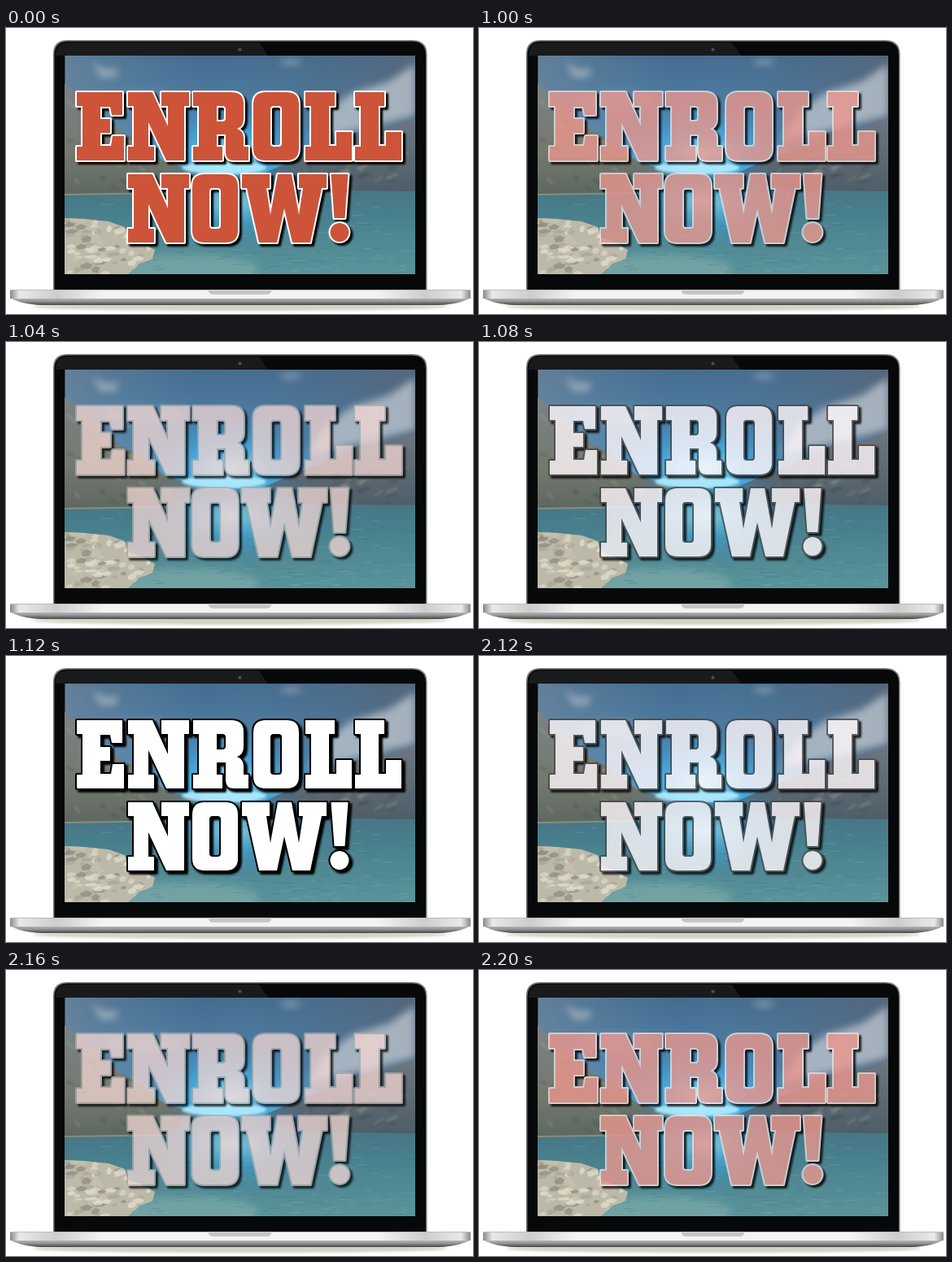
Animation, 574 px wide and 352 px high, one loop 2240 ms. Source, as an HTML page:

```html
<!DOCTYPE html>
<html lang="en">
<head>
<meta charset="utf-8">
<title>Enroll now!</title>
<style>
  html, body { margin: 0; width: 100%; height: 100%; overflow: hidden; background: #fff; }
  svg { display: block; width: 574px; height: 352px; }
  #words {
    stroke-width: 4; stroke-linejoin: round; paint-order: stroke; fill-rule: evenodd;
    filter: drop-shadow(3px 3px 1.3px #000);
  }
</style>
</head>
<body>
<svg viewBox="0 0 574 352">
  <defs>
    <linearGradient id="sky" x2="0" y2="1">
      <stop offset="0" stop-color="#456c8e"/>
      <stop offset=".35" stop-color="#4f86ae"/>
      <stop offset=".55" stop-color="#74b4d4"/>
    </linearGradient>
    <linearGradient id="side">
      <stop offset="0" stop-color="#7c8e9e" stop-opacity=".55"/>
      <stop offset=".4" stop-color="#5d87a8" stop-opacity="0"/>
      <stop offset=".62" stop-color="#526d89" stop-opacity=".2"/>
      <stop offset="1" stop-color="#596577" stop-opacity=".8"/>
    </linearGradient>
    <radialGradient id="glow">
      <stop offset="0" stop-color="#9ce8ff"/>
      <stop offset=".4" stop-color="#45b1e6" stop-opacity=".75"/>
      <stop offset="1" stop-color="#2b86c6" stop-opacity="0"/>
    </radialGradient>
    <linearGradient id="water" x2="0" y2="1">
      <stop offset="0" stop-color="#47707f"/>
      <stop offset=".4" stop-color="#487f8d"/>
      <stop offset="1" stop-color="#5a949a"/>
    </linearGradient>
    <linearGradient id="hillL" x2="0" y2="1">
      <stop offset="0" stop-color="#7b8286"/>
      <stop offset=".6" stop-color="#74796f"/>
      <stop offset="1" stop-color="#5d675f"/>
    </linearGradient>
    <linearGradient id="hillR" x2="0" y2="1">
      <stop offset="0" stop-color="#6d7680"/>
      <stop offset="1" stop-color="#4c5c66"/>
    </linearGradient>
    <linearGradient id="deck">
      <stop offset="0" stop-color="#888"/>
      <stop offset=".02" stop-color="#e9e9e9"/>
      <stop offset=".1" stop-color="#cdcdcd"/>
      <stop offset=".2" stop-color="#f3f3f3"/>
      <stop offset=".8" stop-color="#f3f3f3"/>
      <stop offset=".9" stop-color="#cdcdcd"/>
      <stop offset=".98" stop-color="#e9e9e9"/>
      <stop offset="1" stop-color="#888"/>
    </linearGradient>
    <linearGradient id="belly" x2="0" y2="1">
      <stop offset="0" stop-color="#bdbdbd"/>
      <stop offset=".5" stop-color="#929292"/>
      <stop offset="1" stop-color="#444"/>
    </linearGradient>
    <filter id="soft" x="-50%" y="-50%" width="200%" height="200%"><feGaussianBlur stdDeviation="5"/></filter>
    <filter id="fuzz" x="-20%" y="-50%" width="140%" height="200%"><feGaussianBlur stdDeviation="1.5"/></filter>
    <clipPath id="screen"><path d="M72.500 34H503V303H72.500Z"/></clipPath>
    <clipPath id="shore"><path id="shorePath" d="M72 234L96 235L126 238L146 245L150 258L166 264L183 273L180 284L164 290L150 303H72Z"/></clipPath>
  </defs>

  <!-- laptop -->
  <ellipse cx="288" cy="343" rx="255" ry="5" fill="#d2d2c4" filter="url(#fuzz)"/>
  <path d="M58 323V32Q58 15 75 15H500Q517.500 15 517.500 32V323Z" fill="#777"/>
  <path d="M59.500 323V33Q59.500 16.500 76 16.500H499Q516 16.500 516 33V323Z" fill="#070809"/>
  <path d="M61 34V33Q61 18 76 18H311L322 34Z" fill="#191a1c"/>
  <circle cx="287.500" cy="26.500" r="2.500" fill="#34363b"/>
  <circle cx="287.500" cy="26.500" r="1" fill="#696e78"/>
  <path d="M5 332H571Q558 340 532 341H44Q18 340 5 332Z" fill="url(#belly)"/>
  <path d="M5 324Q5 322 8 322H568Q571 322 571 324V333H5Z" fill="url(#deck)"/>
  <path d="M5 322.500H571" stroke="#bbb"/>
  <path d="M249 322H326V324Q325 328 320 328H255Q250 328 249 324Z" fill="#c6c6c6"/>

  <!-- lake view -->
  <g clip-path="url(#screen)">
    <path d="M72 34H503V303H72Z" fill="url(#sky)"/>
    <path d="M72 34H503V210H72Z" fill="url(#side)"/>
    <ellipse cx="276" cy="158" rx="125" ry="72" fill="url(#glow)"/>
    <g fill="#bac4cc" filter="url(#soft)">
      <path d="M106 42L122 52L138 50L134 60L116 60Z" opacity=".7"/>
      <ellipse cx="350" cy="42" rx="14" ry="3" opacity=".6"/>
      <path d="M503 44L470 66L425 80L392 104L372 138L430 126L503 108Z" opacity=".8"/>
      <ellipse cx="170" cy="90" rx="50" ry="12" opacity=".25"/>
    </g>
    <path d="M72 68L88 82L110 100L142 128L168 142L194 164L226 174L250 180V208H72Z" fill="url(#hillL)"/>
    <path d="M503 112L470 124L432 128L396 146L360 160L318 178V208H503Z" fill="url(#hillR)"/>
    <g id="cliffs" filter="url(#fuzz)"/>
    <path d="M72 206L200 203L230 180H325L360 199L503 201V303H72Z" fill="url(#water)"/>
    <path d="M72 205L200 203" stroke="#a3a793" stroke-width="2" opacity=".6"/>
    <ellipse cx="278" cy="214" rx="125" ry="62" fill="url(#glow)" opacity=".75"/>
    <ellipse cx="268" cy="172" rx="52" ry="8" fill="#b5efff" filter="url(#fuzz)" opacity=".85"/>
    <ellipse cx="225" cy="298" rx="85" ry="20" fill="#86b0ad" filter="url(#soft)" opacity=".55"/>
    <g id="ripples"/>
    <use href="#shorePath" fill="#bdb9a8"/>
    <g id="rocks" clip-path="url(#shore)"/>
  </g>

  <g id="words" role="img" aria-label="ENROLL NOW!"/>
</svg>
<script>
const $ = id => document.getElementById(id);

function add(parent, attrs) {
  const path = document.createElementNS('http://www.w3.org/2000/svg', 'path');
  for (const key in attrs) path.setAttribute(key, attrs[key]);
  $(parent).append(path);
}

let seed = 11;
const rand = (a, b) => {
  seed = seed * 16807 % 2147483647;
  return a + (b - a) * seed / 2147483647;
};

const glyphs = {
  E: 'M0 0H56V28H43L41 18H29V33H41V50H29V66H42L44 54H58V84H0V67H7V17H0Z',
  N: 'M0 0H30L49 42V17H41V0H75V17H69V84H47L25 37V67H32V84H0V67H7V17H0Z',
  R: 'M0 0H47Q62 0 62 14V33Q62 42 54 45Q62 48 62 56V67H68V84H50Q40 84 40 74V52H29V67H36V84H0V67H7V17H0ZM29 17V36H36Q40 36 40 32V21Q40 17 36 17Z',
  O: 'M15 0H41Q56 0 56 15V69Q56 84 41 84H15Q0 84 0 69V15Q0 0 15 0ZM25 17Q21 17 21 21V63Q21 67 25 67H31Q35 67 35 63V21Q35 17 31 17Z',
  L: 'M0 0H36V17H29V66H38V49H57V84H0V67H7V17H0Z',
  W: 'M0 0H34V17H30L35 50L44 0H61L70 50L75 17H70V0H104V17H98L84 84H62L52 42L43 84H21L6 17H0Z',
  '!': 'M0 0H21L17 54H4ZM10.500 60A11.500 11.500 0 1 1 10.400 60Z'
};

function write(text, y, xs) {
  [...text].forEach((ch, i) => add('words', { d: glyphs[ch], transform: `translate(${xs[i]} ${y})` }));
}

write('ENROLL', 79, [87, 150, 230, 304, 368, 429]);
write('NOW!', 180, [150, 229, 290, 399.5]);

// faint streaks on both mountainsides
for (let i = 0; i < 60; i++) {
  const right = i % 2, t = rand(0, 1);
  const x = right ? 495 - 145 * t : 75 + 135 * t;
  const top = right ? 124 + 54 * t : 86 + 88 * t;
  const y = rand(top, 200), run = rand(5, 15) * (right ? -1 : 1);
  add('cliffs', {
    d: `M${x} ${y}l${run} ${rand(3, 9)}`, stroke: rand(0, 1) < .5 ? '#a3a592' : '#39474b',
    'stroke-width': rand(1, 4), opacity: .4
  });
}

for (let i = 0; i < 160; i++) {
  add('ripples', {
    d: `M${rand(110, 495)} ${rand(211, 302)}h${rand(4, 16)}`,
    stroke: i % 2 ? '#8cc4c8' : '#286878', opacity: .25
  });
}

const stones = ['#dcd7c4', '#c9c2ac', '#8f8e80', '#e4e0cf', '#aaa797'];
for (let i = 0; i < 90; i++) {
  const w = rand(6, 18), h = rand(3, 9);
  add('rocks', {
    d: `M${rand(66, 182)} ${rand(232, 302)}l${w * .5} ${-h * .5}l${w * .5} ${h * .4}l${-w * .25} ${h * .6}l${-w * .6} ${h * .1}Z`,
    fill: stones[i % 5], opacity: .75
  });
}

const red = { fill: '#cd5439', stroke: '#fff', opacity: 1 };
const pink = { fill: '#eb968c', stroke: '#e6e2e2', opacity: .8 };
const pale = { fill: '#f5d7d3', stroke: '#aeaeae', opacity: .75 };
const mist = { fill: '#fff8fa', stroke: '#484848', opacity: .8 };
const white = { fill: '#fff', stroke: '#000', opacity: 1 };
const steps = [
  [1000, red], [1040, pink], [1080, pale], [1120, mist],
  [2120, white], [2160, mist], [2200, pale], [2240, pink]
];

const start = performance.now();
function draw() {
  const t = (performance.now() - start) % 2240;
  Object.assign($('words').style, steps.find(([end]) => t < end)[1]);
  requestAnimationFrame(draw);
}
draw();
</script>
</body>
</html>
```
